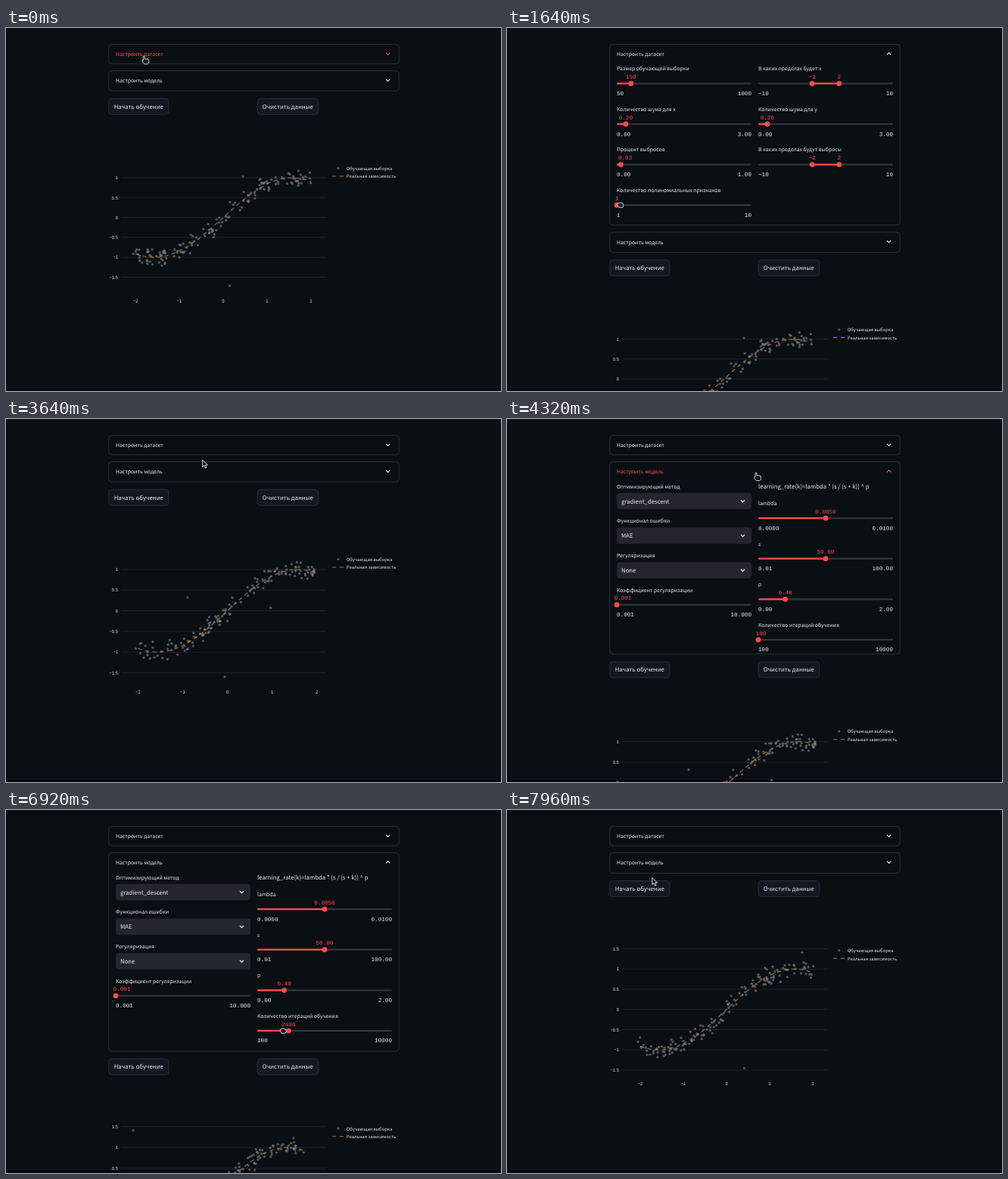
An HTML page that plays this animation: 654 px wide and 480 px high, repeating every 8 s.

```html
<!DOCTYPE html>
<html lang="ru">
<head>
<meta charset="utf-8">
<title>Настройка модели</title>
<style>
html, body { margin: 0; width: 100%; height: 100%; overflow: hidden; background: #0a0f14; }
svg { display: block; width: 654px; height: 480px; text-rendering: geometricPrecision; }
</style>
</head>
<body>
<svg id="stage" viewBox="0 0 654 480" xmlns="http://www.w3.org/2000/svg"></svg>
<script>
const LOOP = 8000;
const RED = '#ff4b4b', INK = '#e9eaeb', LINE = '#2b3037';
const SMALL = 7.64, BIG = 8.73, TINY = 6.55;
const LEFT = 145, RIGHT = 332, TRACK = 178, ROW = 53.6;
const MONO = '"Liberation Mono", "DejaVu Sans Mono", monospace';
const stage = document.getElementById('stage');

// Pick a proportional Cyrillic face and scale it so the longest label is 137.5 px wide.
const pen = document.createElement('canvas').getContext('2d');
const measure = family => {
  pen.font = '100px ' + family;
  return pen.measureText('Количество полиномиальных признаков').width / 100;
};
let SANS = '"Noto Sans CJK JP", "Noto Sans CJK SC", "Noto Sans", sans-serif';
if (measure(SANS) > 24) SANS = '"Noto Sans", "Open Sans", sans-serif';
const fit = 137.5 / measure(SANS) / SMALL;

const clamp = (v, lo, hi) => Math.max(lo, Math.min(hi, v));
const minus = s => String(s).replace('-', '−');

function set(n, attrs) {
  for (const a in attrs) n.setAttribute(a, attrs[a]);
}
function el(tag, attrs, parent = stage) {
  const n = document.createElementNS('http://www.w3.org/2000/svg', tag);
  set(n, attrs);
  return parent.appendChild(n);
}
function text(parent, str, x, cy, size = SMALL, fill = INK, anchor = 'start', mono = false) {
  const n = el('text', {
    x, y: cy + size * 0.34, fill, 'text-anchor': anchor,
    'font-family': mono ? MONO : SANS, 'font-size': mono ? size : size * fit
  }, parent);
  n.textContent = str;
  return n;
}
function box(parent, x, y, width, height, fill, stroke = 'none', rx = 4) {
  return el('rect', { x, y, width, height, rx, fill, stroke }, parent);
}
function chevron(parent, x, y) {
  return el('path', {
    d: 'M-2.6,-1.3 L0,1.3 L2.6,-1.3', transform: `translate(${x} ${y})`,
    fill: 'none', stroke: INK, 'stroke-width': 1.2
  }, parent);
}

// One or two thumbs on a track; returns a setter for the values.
function slider(parent, x, y, name, min, max, ...vals) {
  const ty = y + 19.7;
  text(parent, name, x, y);
  box(parent, x, ty - 1.1, TRACK, 2.2, '#33363c', 'none', 1.1);
  const bar = box(parent, x, ty - 1.1, 0, 2.2, RED, 'none', 1.1);
  text(parent, minus(min), x, y + 32.7, SMALL, INK, 'start', true);
  text(parent, minus(max), x + TRACK, y + 32.7, SMALL, INK, 'end', true);
  const thumbs = vals.map(() => ({
    dot: el('circle', { cy: ty, r: 3.4, fill: RED }, parent),
    tag: text(parent, '', 0, y + 10.8, SMALL, RED, 'start', true)
  }));
  const put = (...now) => {
    const pos = now.map(v => x + TRACK * (v - min) / (max - min));
    thumbs.forEach(({ dot, tag }, i) => {
      const left = pos[i] - String(now[i]).length * SMALL * 0.3;
      dot.setAttribute('cx', pos[i]);
      tag.setAttribute('x', left < x - 3.4 ? pos[i] - 3.4 : left);
      tag.textContent = minus(now[i]);
    });
    const from = pos.length > 1 ? pos[0] : x;
    set(bar, { x: from, width: pos[pos.length - 1] - from });
  };
  put(...vals);
  return put;
}

// Collapsible panel; returns its content group and a draw function.
function panel(parent, id, top, closed, name) {
  const frame = box(parent, 135.8, top, 383.4, closed, 'none', LINE);
  const clip = el('clipPath', { id }, parent);
  const hole = box(clip, 130, top, 394, closed, INK);
  const body = el('g', { 'clip-path': `url(#${id})` }, parent);
  const title = text(parent, name, LEFT, top + 13.1);
  const cy = top + 12.4, mark = chevron(parent, 504.6, cy);
  return {
    body,
    draw(extra, open, hover) {
      const color = hover ? RED : INK;
      frame.setAttribute('height', closed + extra);
      hole.setAttribute('height', closed + extra);
      body.setAttribute('display', extra > 0.01 ? 'inline' : 'none');
      title.setAttribute('fill', color);
      set(mark, { stroke: color, transform: `translate(504.6 ${cy}) scale(1 ${open ? -1 : 1})` });
    }
  };
}

el('rect', { y: 477, width: 654, height: 3, fill: '#0d0510' });

// Dataset panel: sliders fill two columns row by row
const dataPanel = panel(stage, 'clipData', 21.7, 25.6, 'Настроить датасет');
const setPoly = [
  ['Размер обучающей выборки', '50', '1000', '150'],
  ['В каких пределах будет x', '-10', '10', '-2', '2'],
  ['Количество шума для x', '0.00', '3.00', '0.20'],
  ['Количество шума для y', '0.00', '3.00', '0.20'],
  ['Процент выбросов', '0.00', '1.00', '0.03'],
  ['В каких пределах будут выбросы', '-10', '10', '-2', '2'],
  ['Количество полиномиальных признаков', '1', '10', '1']
].map((s, i) => slider(dataPanel.body, i % 2 ? RIGHT : LEFT, 53.7 + ROW * (i >> 1), ...s)).pop();

// Model panel
const lower = el('g', {});
const modelPanel = panel(lower, 'clipModel', 56.6, 26.6, 'Настроить модель');
const mb = modelPanel.body;
[
  ['Оптимизирующий метод', 'gradient_descent'],
  ['Функционал ошибки', 'MAE'],
  ['Регуляризация', 'None']
].forEach(([name, value], i) => {
  const y = 89 + 45.75 * i;
  text(mb, name, LEFT, y);
  box(mb, LEFT, y + 8.8, TRACK, 21.4, '#24262e');
  text(mb, value, LEFT + 6, y + 19.6, BIG);
  chevron(mb, 311.5, y + 19.5);
});
slider(mb, LEFT, 226, 'Коэффициент регуляризации', '0.001', '10.000', '0.001');
text(mb, 'learning_rate(k)=lambda * (s / (s + k)) ^ p', RIGHT, 89, BIG);
const setIters = [
  ['lambda', '0.0000', '0.0100', '0.0050'],
  ['s', '0.01', '100.00', '50.00'],
  ['p', '0.00', '2.00', '0.40'],
  ['Количество итераций обучения', '100', '10000', '100']
].map((s, i) => slider(mb, RIGHT, 111.4 + ROW * i, ...s)).pop();

// Buttons and legend
const rest = el('g', {});
function button(x, width, label) {
  box(rest, x, 93.3, width, 21, '#121720', LINE);
  text(rest, label, x + width / 2, 103.8, BIG, INK, 'middle');
}
button(135.8, 79, 'Начать обучение');
button(332.2, 80.4, 'Очистить данные');

const DOT = { r: 1.65, fill: '#82858c', 'fill-opacity': 0.62 };
const DASH = { fill: 'none', stroke: '#b0741c', 'stroke-width': 1.1, 'stroke-dasharray': '5.3 4.5' };
el('circle', { cx: 438.8, cy: 185.4, ...DOT }, rest);
el('path', { d: 'M431,196 H447', ...DASH }, rest);
text(rest, 'Обучающая выборка', 450, 185.6, TINY);
text(rest, 'Реальная зависимость', 450, 196, TINY);

function random(seed) {
  return () => {
    seed = (seed + 0x6D2B79F5) | 0;
    let r = Math.imul(seed ^ (seed >>> 15), 1 | seed);
    r = (r + Math.imul(r ^ (r >>> 7), 61 | r)) ^ r;
    return ((r ^ (r >>> 14)) >>> 0) / 4294967296;
  };
}

// Noisy sine samples; the data range always spans the same part of the plot.
function chart({ seed, x: [xa, xb], y: [ya, yb], far }) {
  const g = el('g', {}, rest), rnd = random(seed);
  const noise = s => (rnd() + rnd() + rnd() + rnd() - 2) * 1.73 * s;
  const px = v => 168 + 239 * (v - xa) / (xb - xa);
  const py = v => 341 - 153 * (v - ya) / (yb - ya);
  for (let v = -2; v <= 2; v += 0.5) {
    const y = py(v);
    if (v % 1 === 0) text(g, minus(v), px(v), 361, TINY, INK, 'middle');
    if (y < 175 || y > 350) continue;
    el('path', { d: `M152,${y} H423`, stroke: '#252a31', 'stroke-width': 0.8 }, g);
    text(g, minus(v), 148, y, TINY, INK, 'end');
  }
  const dot = (x, y) => el('circle', { cx: px(x), cy: py(y), ...DOT }, g);
  for (let i = 0; i < 147; i++) {
    const x = -2 + 4 * rnd();
    dot(clamp(x + noise(0.06), xa, xb), clamp(Math.sin(x) + noise(0.1), ya, yb));
  }
  far.forEach(p => dot(...p));
  const curve = Array.from({ length: 41 }, (_, i) => [px(i / 10 - 2), py(Math.sin(i / 10 - 2))]);
  el('path', { d: 'M' + curve.join('L'), ...DASH }, g);
  return g;
}

const charts = [
  { from: 0, seed: 11, x: [-2.05, 2.07], y: [-1.72, 1.19], far: [[0.15, -1.72], [0.45, 1.03]] },
  { from: 2280, seed: 27, x: [-2.11, 1.94], y: [-1.6, 1.2], far: [[-0.06, -1.6], [-0.89, 0.32], [0.97, 0.07]] },
  { from: 6200, seed: 38, x: [-2.03, 2.2], y: [-1.37, 1.41], far: [[-2.03, 1.41]] },
  { from: 7240, seed: 52, x: [-2.14, 2.05], y: [-1.45, 1.41], far: [[0.41, -1.45], [1.75, 1.41]] }
].map(c => ({ from: c.from, node: chart(c) }));

// Cursor shapes, drawn from their hot spot
const shapes = {
  arrow: 'M0,0 V9.4 L2.2,7.3 L3.7,10.7 L5.3,10 L3.8,6.8 H6.8 Z',
  hand: 'M-1,1 a1,1 0 0 1 2,0 v3 h3.5 q2,0 2,2 v1.5 q0,2.5 -1.5,3.2 h-4.5 q-2,-2 -3,-4.2 q0,-1.4 1.5,-.6 z',
  grab: 'M-4,-1 q.5,-2 2,-1.5 q2,-1 4,0 q2,0 2,1.7 v1.4 q0,1.6 -1,2.6 h-5 q-2,-2 -2,-4.2 z'
};
const cursor = el('path', { fill: '#15181c', stroke: '#e8e8e8', 'stroke-width': 0.9, 'stroke-linejoin': 'round' });

// Cursor stops: arrival time, x, y and the slider dragged on the way
const stops = [
  [0, 182.3, 37], [1000, 434, 68], [1600, 149.7, 234], [2000, 188, 234, 'poly'],
  [2800, 188, 37.5], [4080, 327.5, 70], [4760, 418, 122], [5100, 332, 291],
  [5560, 388.5, 294, 'iters'], [6360, 398, 111], [6680, 388.5, 292],
  [6920, 366.2, 292, 'iters'], [7420, 328, 70], [7960, 191.8, 89.4]
];
const LAG = 64;

const segment = t => {
  const i = stops.findIndex(s => s[0] >= t);
  return i < 0 ? stops.length - 1 : Math.max(1, i);
};
// Between stops the cursor rests for 30 % of the time, then glides.
function place(t) {
  const i = segment(t), a = stops[i - 1], b = stops[i];
  const u = clamp(((t - a[0]) / (b[0] - a[0]) - 0.3) / 0.7, 0, 1);
  const e = u * u * (3 - 2 * u);
  return [a[1] + (b[1] - a[1]) * e, a[2] + (b[2] - a[2]) * e];
}
// Value of a dragged slider: its thumb follows the cursor a little late.
function dragged(t, name, x, min, max, step) {
  let v = min;
  stops.forEach((s, i) => {
    if (s[3] !== name || t < stops[i - 1][0]) return;
    const at = place(clamp(t - LAG, stops[i - 1][0], s[0]))[0];
    v = min + (max - min) * clamp((at - x) / TRACK, 0, 1);
  });
  return Math.round(v / step) * step;
}

// cubic-bezier(.23, 1, .32, 1) over 500 ms
function ease(ms) {
  const u = clamp(ms / 500, 0, 1);
  let lo = 0, hi = 1;
  for (let i = 0; i < 24; i++) {
    const s = (lo + hi) / 2, r = 1 - s;
    if (0.69 * s * r * r + 0.96 * s * s * r + s * s * s < u) lo = s; else hi = s;
  }
  return 1 - (1 - lo) ** 3;
}
const fold = (t, [on, off], size) => size * (ease(t - on) - ease(t - off));
const within = (t, [on, off]) => t >= on && t < off;
const dataOpen = [120, 3064], modelOpen = [4070, 7560];

function draw(t) {
  const o1 = fold(t, dataOpen, 213.4), o2 = fold(t, modelOpen, 235.7);
  const [x, y] = place(t);
  const over1 = within(y, [21, 47.5]), over2 = within(y, [56 + o1, 83.5 + o1]);
  dataPanel.draw(o1, within(t, dataOpen), over1);
  modelPanel.draw(o2, within(t, modelOpen), over2);
  lower.setAttribute('transform', `translate(0 ${o1})`);
  rest.setAttribute('transform', `translate(0 ${o1 + o2})`);

  setPoly(dragged(t, 'poly', LEFT, 1, 10, 1));
  setIters(dragged(t, 'iters', RIGHT, 100, 10000, 50));

  charts.forEach((c, i) => {
    const end = i + 1 < charts.length ? charts[i + 1].from : LOOP;
    c.node.setAttribute('display', within(t, [c.from, end]) ? 'inline' : 'none');
  });

  const kind = stops[segment(t)][3] ? 'grab' : over1 || over2 ? 'hand' : 'arrow';
  set(cursor, { d: shapes[kind], transform: `translate(${x} ${y})` });
}

let start;
function tick(now) {
  if (start === undefined) start = now;
  draw((now - start) % LOOP);
  requestAnimationFrame(tick);
}
draw(0);
requestAnimationFrame(tick);
</script>
</body>
</html>
```
